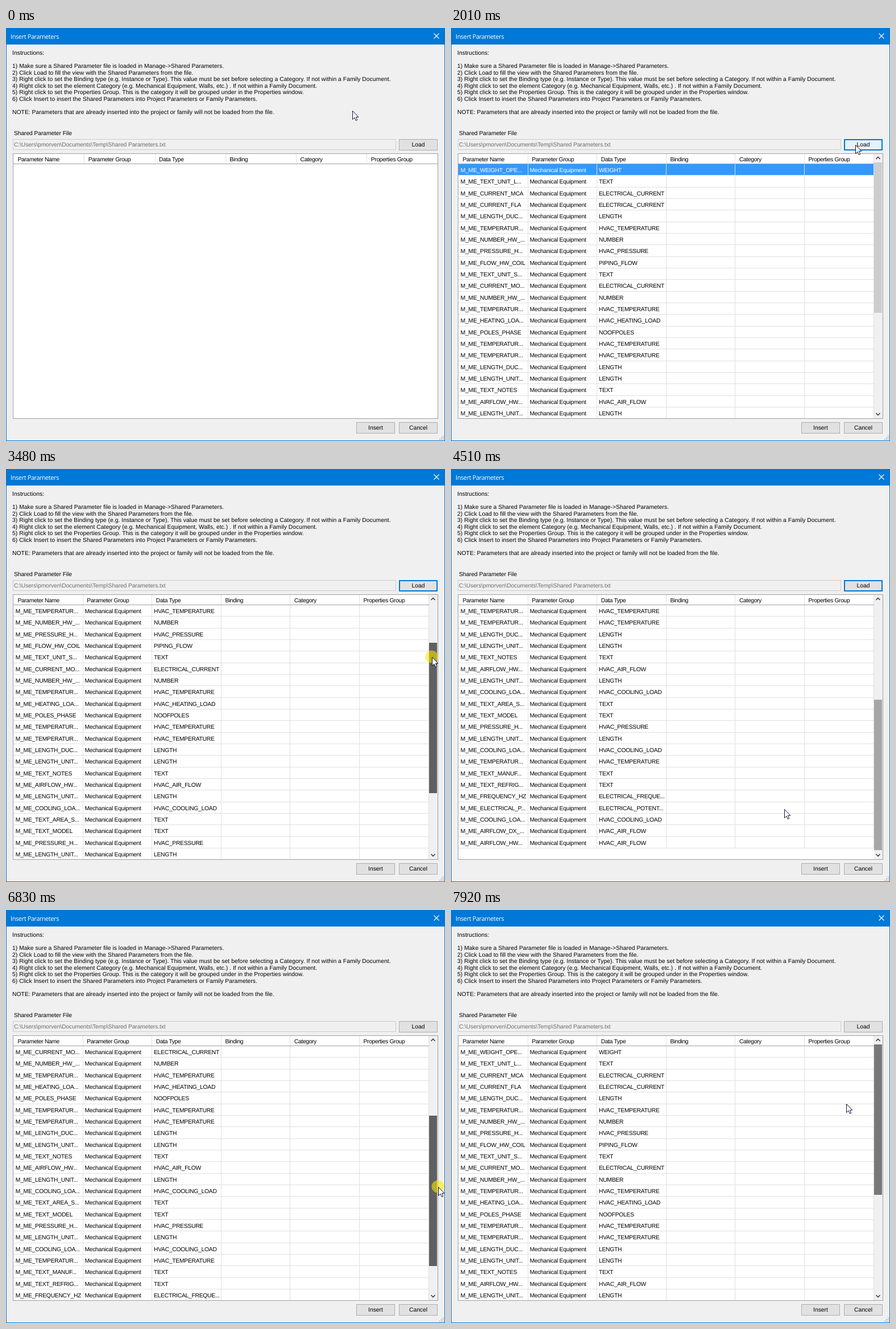
Write an HTML page with a canvas that moves like this. It is 772 px wide and 725 px high and loops after 7.99 s.

```html
<!DOCTYPE html>
<html lang="en">
<head>
<meta charset="utf-8">
<title>Insert Parameters</title>
<style>
  html, body { margin: 0; width: 100%; height: 100%; overflow: hidden; }
  canvas { display: block; }
</style>
</head>
<body>
<canvas id="stage" width="772" height="725"></canvas>
<script>
const ctx = document.getElementById('stage').getContext('2d');
const LOOP = 7990, ROW_H = 20.33, TOP = 239, TRACK = 169, COLUMN = 121.6;
const UI = '10.3px "Liberation Sans", Arial, sans-serif';

const instructions = [
  'Instructions:',
  '',
  '1) Make sure a Shared Parameter file is loaded in Manage->Shared Parameters.',
  '2) Click Load to fill the view with the Shared Parameters from the file.',
  '3) Right click to set the Binding type (e.g. Instance or Type). This value must be set before selecting a Category. If not within a Family Document.',
  '4) Right click to set the element Category (e.g. Mechanical Equipment, Walls, etc.) . If not within a Family Document.',
  '5) Right click to set the Properties Group. This is the category it will be grouped under in the Properties window.',
  '6) Click Insert to insert the Shared Parameters into Project Parameters or Family Parameters.',
  '',
  'NOTE: Parameters that are already inserted into the project or family will not be loaded from the file.'
];
const headers = ['Parameter Name', 'Parameter Group', 'Data Type', 'Binding', 'Category', 'Properties Group'];
const rows = `WEIGHT_OPE... WEIGHT
TEXT_UNIT_L... TEXT
CURRENT_MCA ELECTRICAL_CURRENT
CURRENT_FLA ELECTRICAL_CURRENT
LENGTH_DUC... LENGTH
TEMPERATUR... HVAC_TEMPERATURE
NUMBER_HW_... NUMBER
PRESSURE_H... HVAC_PRESSURE
FLOW_HW_COIL PIPING_FLOW
TEXT_UNIT_S... TEXT
CURRENT_MO... ELECTRICAL_CURRENT
NUMBER_HW_... NUMBER
TEMPERATUR... HVAC_TEMPERATURE
HEATING_LOA... HVAC_HEATING_LOAD
POLES_PHASE NOOFPOLES
TEMPERATUR... HVAC_TEMPERATURE
TEMPERATUR... HVAC_TEMPERATURE
LENGTH_DUC... LENGTH
LENGTH_UNIT... LENGTH
TEXT_NOTES TEXT
AIRFLOW_HW... HVAC_AIR_FLOW
LENGTH_UNIT... LENGTH
COOLING_LOA... HVAC_COOLING_LOAD
TEXT_AREA_S... TEXT
TEXT_MODEL TEXT
PRESSURE_H... HVAC_PRESSURE
LENGTH_UNIT... LENGTH
COOLING_LOA... HVAC_COOLING_LOAD
TEMPERATUR... HVAC_TEMPERATURE
TEXT_MANUF... TEXT
TEXT_REFRIG... TEXT
FREQUENCY_HZ ELECTRICAL_FREQUE...
ELECTRICAL_P... ELECTRICAL_POTENT...
COOLING_LOA... HVAC_COOLING_LOAD
AIRFLOW_DX_... HVAC_AIR_FLOW
AIRFLOW_HW... HVAC_AIR_FLOW`.split('\n').map(line => line.split(' '));

const linear = p => p;
const smooth = p => p * p * (3 - 2 * p);
const easeIn = p => p ** 1.4;
const easeOut = p => 1 - (1 - p) ** 1.7;

// Pointer moves: first step, last step, number of steps, target x, y, easing
const moves = [
  [70, 850, 11, 708, 199, smooth],
  [930, 930, 1, 706, 199, linear],
  [2010, 2700, 10, 752, 260, linear],
  [3100, 3800, 10, 745, 445, easeIn],
  [4120, 4900, 11, 530, 651, easeOut],
  [4970, 4970, 1, 528, 654, linear],
  [5600, 6380, 11, 747, 541, easeOut],
  [6460, 6830, 5, 760, 486, linear],
  [6910, 7220, 5, 761, 376, linear],
  [7300, 7610, 5, 761, 308, linear],
  [7760, 7920, 3, 695, 340, linear]
];
const presses = [[1310, 1460], [2870, 3800], [5140, 5290], [6460, 7610]];

const within = (v, a, b) => v >= a && v < b;
const clamp = (v, a, b) => Math.min(b, Math.max(a, v));

function progress(t, start, end, steps) {
  if (t < start) return 0;
  if (t >= end) return 1;
  return (Math.floor((t - start) / (end - start) * (steps - 1)) + 1) / steps;
}

function pointerAt(t) {
  let x = 609, y = 145;
  for (const [start, end, steps, toX, toY, ease] of moves) {
    if (t < start) break;
    const p = ease(progress(t, start, end, steps));
    x += (toX - x) * p;
    y += (toY - y) * p;
  }
  return { x: Math.round(x), y: Math.round(y) };
}

function rect(x, y, w, h, fill) {
  ctx.fillStyle = fill;
  ctx.fillRect(x, y, w, h);
}

function box(x, y, w, h, border, fill, width = 1) {
  rect(x, y, w, h, border);
  rect(x + width, y + width, w - 2 * width, h - 2 * width, fill);
}

function text(str, x, y, spacing, color = '#000', align = 'left') {
  ctx.font = UI;
  ctx.letterSpacing = spacing + 'px';
  ctx.textAlign = align;
  ctx.fillStyle = color;
  ctx.fillText(str, x, y);
}

function stroke(color, width, ...points) {
  ctx.strokeStyle = color;
  ctx.lineWidth = width;
  ctx.beginPath();
  points.forEach(([x, y]) => ctx.lineTo(x, y));
  ctx.stroke();
}

function button(label, x, y, border = '#adadad', fill = '#e1e1e1', width = 1) {
  box(x, y, 68, 20, border, fill, width);
  text(label, x + 34, y + 13, 0, '#000', 'center');
}

function drawWindow() {
  box(0, 0, 772, 725, '#0078d7', '#f0f0f0');
  rect(0, 0, 772, 29, '#0078d7');
  ctx.font = '11px "Open Sans", sans-serif';
  ctx.letterSpacing = '-0.4px';
  ctx.textAlign = 'left';
  ctx.fillStyle = '#fff';
  ctx.fillText('Insert Parameters', 8, 19);
  stroke('#fff', 1.1, [752.5, 9.5], [761.5, 18.5]);
  stroke('#fff', 1.1, [761.5, 9.5], [752.5, 18.5]);

  instructions.forEach((line, i) => text(line, 11, Math.round(47.2 + 11.5 * i), 0.05));
  text('Shared Parameter File', 14, 188, -0.08);
  box(12, 195, 674, 19, '#cccccc', '#f0f0f0');
  text('C:\\Users\\pmorven\\Documents\\Temp\\Shared Parameters.txt', 14, 208, -0.1, '#6d6d6d');

  button('Insert', 616, 692);
  button('Cancel', 691, 692);
  for (let i = 0; i < 3; i++)
    for (let j = 0; j <= i; j++) rect(768 - 3 * j, 715 + 3 * i, 2, 2, '#bfbfbf');
}

function drawLoadButton(t, pointer) {
  const hover = within(pointer.x, 691, 760) && within(pointer.y, 195, 215);
  const focused = within(t, 1310, 5140);
  if (within(t, 1310, 1460)) button('Load', 691, 195, '#005499', '#cce4f7', 2);
  else button('Load', 691, 195, hover || focused ? '#0078d7' : '#adadad',
    hover ? '#e5f1fb' : '#e1e1e1', focused ? 2 : 1);
}

function drawHeader(loaded, pointer) {
  const step = loaded ? COLUMN : 124.25;
  if (loaded && within(pointer.y, 221, 239) && pointer.x < 743) rect(622, 221, 121, 17, '#d9ebf9');
  headers.forEach((label, i) => {
    text(label, 20.6 + step * i, 234, -0.36);
    if (i < 5 || loaded) rect(Math.round(13 + step * (i + 1)), 221, 1, 17, '#e0e0e0');
  });
  rect(13, 238, loaded ? 731 : 746, 1, '#a0a0a0');
}

function drawRows(first, selected) {
  ctx.save();
  ctx.beginPath();
  ctx.rect(13, TOP, 731, 446);
  ctx.clip();
  rows.slice(first, first + 22).forEach(([name, type], i) => {
    const y = Math.round(TOP + ROW_H * i), next = Math.round(TOP + ROW_H * (i + 1));
    const isSelected = first + i === selected;
    const color = isSelected ? '#fff' : '#000';
    if (isSelected) rect(13, y, 730, next - y, '#3399ff');
    rect(13, next - 1, 731, 1, '#e0e0e0');
    for (let c = 1; c < 7; c++) rect(Math.round(13 + COLUMN * c), y, 1, next - y, '#e0e0e0');
    ['M_ME_' + name, 'Mechanical Equipment', type].forEach((cell, c) =>
      text(cell, 16.8 + COLUMN * c, y + 14, -0.25, color));
    if (isSelected && selected === 35) {
      ctx.setLineDash([1, 1]);
      ctx.strokeStyle = '#000';
      ctx.lineWidth = 1;
      ctx.strokeRect(500.5, y + 0.5, 119, next - y - 2);
      ctx.setLineDash([]);
    }
  });
  ctx.restore();
}

function thumbColor(t, pointer, offset) {
  if (within(t, 3100, 3800) || within(t, 6460, 7610)) return '#606060';
  if (t >= 7610) return '#787878';
  if (within(t, 3800, 4900)) {
    const v = 120 + Math.round(85 * progress(t, 4120, 4900, 11));
    return `rgb(${v},${v},${v})`;
  }
  const hover = within(pointer.x, 744, 759) && within(pointer.y, 236 + offset, 500 + offset);
  return hover ? '#a6a6a6' : '#cdcdcd';
}

function drawScrollbar(t, pointer, offset) {
  rect(744, 221, 15, 464, '#f0f0f0');
  rect(744, 236 + offset, 14, 264, thumbColor(t, pointer, offset));
  stroke('#404040', 1.6, [747.5, 230], [751, 226.5], [754.5, 230]);
  stroke('#404040', 1.6, [747.5, 676], [751, 679.5], [754.5, 676]);
}

function scrollOffset(t, y) {
  if (t < 2870) return 0;
  if (t < 3800) return clamp(y - 261, 0, TRACK);
  return t < 6460 ? TRACK : clamp(y - 361, 0, TRACK);
}

function drawPointer(t, { x, y }) {
  if (presses.some(([a, b]) => within(t, a, b))) {
    ctx.fillStyle = 'rgba(250,232,0,.58)';
    ctx.beginPath();
    ctx.arc(x - 0.5, y - 0.5, 11, 0, 7);
    ctx.fill();
  }
  const arrow = new Path2D('M.5 .5V15.5L4 12.3L6.3 17.5L8.7 16.5L6.4 11.3H10.8Z');
  ctx.save();
  ctx.translate(x, y);
  ctx.fillStyle = '#fff';
  ctx.fill(arrow);
  ctx.strokeStyle = '#15123a';
  ctx.lineWidth = 1;
  ctx.stroke(arrow);
  ctx.restore();
}

function draw(now) {
  const t = now % LOOP;
  const pointer = pointerAt(t);
  const loaded = t >= 1460;
  ctx.textRendering = 'geometricPrecision';
  drawWindow();
  drawLoadButton(t, pointer);
  box(12, 220, 748, 466, '#a0a0a0', '#fff');
  drawHeader(loaded, pointer);
  if (loaded) {
    const offset = scrollOffset(t, pointer.y);
    const first = offset === TRACK ? 15 : Math.floor(offset / TRACK * 14.07);
    drawRows(first, t < 5140 ? 0 : 35);
    drawScrollbar(t, pointer, offset);
  }
  drawPointer(t, pointer);
}

const began = performance.now();
function tick() {
  draw(performance.now() - began);
  requestAnimationFrame(tick);
}
tick();
</script>
</body>
</html>
```
